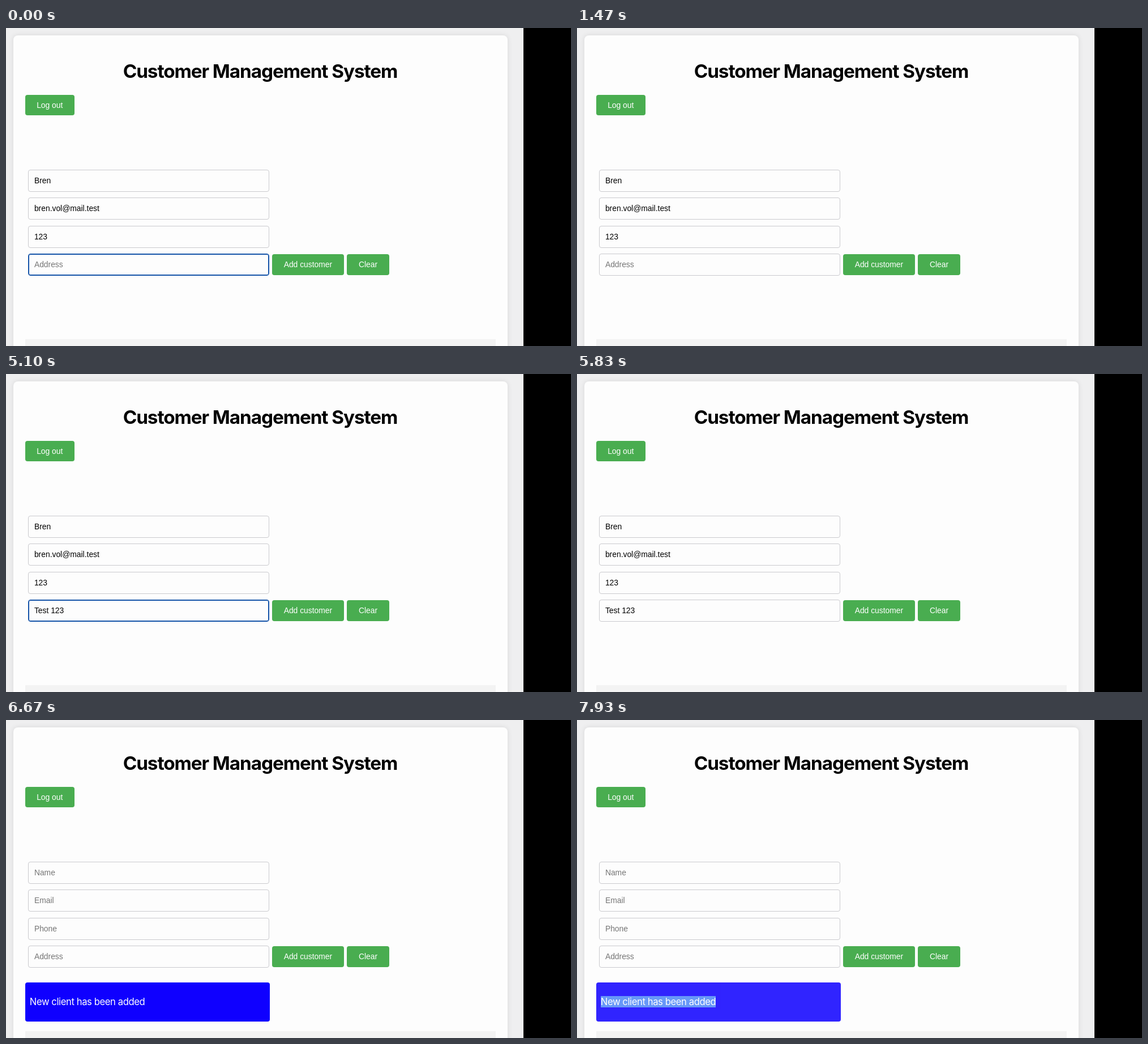
Animation of 998 by 561 pixels, one loop 8000 ms. Source, as an HTML page:

```html
<!DOCTYPE html>
<html lang="en">
<head>
<meta charset="utf-8">
<title>Customer form</title>
<style>
  html, body { margin: 0; width: 100%; height: 100%; overflow: hidden; }
  body { background: #000; }
  #stage {
    position: relative; width: 998px; height: 561px; overflow: hidden;
    font: 13.86px "Liberation Sans", Arial, sans-serif; color: #000;
  }
  #stage div { position: absolute; box-sizing: border-box; white-space: pre; }
  #stage .page { left: 0; top: 0; width: 913.5px; height: 561px; background: #efeff0; overflow: hidden; }
  .card {
    left: 12.5px; top: 12.5px; width: 873.5px; height: 640px;
    background: #fdfdfd; border-radius: 8px; box-shadow: 0 0 10px rgba(0, 0, 0, .1);
  }
  h1 {
    position: absolute; left: 12.5px; top: 56.2px; width: 873px; margin: 0;
    font: 700 33.27px/40px Inter, sans-serif; font-optical-sizing: none;
    letter-spacing: -.032em; text-align: center; white-space: nowrap;
  }
  .btn {
    height: 36.8px; line-height: 36.8px; border-radius: 4px;
    background: #49ad50; color: #fff; text-align: center;
  }
  .field {
    left: 38.5px; width: 426px; height: 38.8px; line-height: 36.8px;
    padding-left: 10.4px; border: 1px solid #cacace; border-radius: 4px;
  }
  .field.empty { color: #757575; }
  .field.focus { border-color: #1453a8; box-shadow: inset 0 0 0 1px #1453a8; }
  .caret {
    display: inline-block; width: 1px; height: 16px; margin-right: -1px;
    background: #000; vertical-align: -3px;
  }
  .toast {
    left: 33.5px; top: 463px; width: 432px; height: 69.2px; padding-left: 8.3px;
    background: #0f00ff; border-radius: 4px; color: #fff;
    font: 16.63px/69.2px Inter, sans-serif; letter-spacing: -.024em;
  }
  .toast.selected span { background: #4f88f8; }
  .head { left: 34px; top: 549px; width: 831px; height: 20px; background: #f3f3f3; }
</style>
</head>
<body>
<div id="stage">
  <div class="page">
    <div class="card"></div>
    <h1>Customer Management System</h1>
    <div class="btn" style="left:33.5px;top:117.5px;width:87.5px">Log out</div>
    <div class="field" style="top:250px"></div>
    <div class="field" style="top:299.4px"></div>
    <div class="field" style="top:348.8px"></div>
    <div class="field" style="top:398.2px"></div>
    <div class="btn" style="left:470px;top:399px;width:126.8px">Add customer</div>
    <div class="btn" style="left:602px;top:399px;width:75px">Clear</div>
    <div class="toast"><span>New client has been added</span></div>
    <div class="head"></div>
  </div>
</div>
<script>
  const LOOP = 8000, CLEARED = 6030, BLINK = 500;
  const fields = [...document.querySelectorAll('.field')];
  const toast = document.querySelector('.toast');
  const labels = ['Name', 'Email', 'Phone', 'Address'];
  const values = ['Bren', 'bren.vol@mail.test', '123'];
  const address = 'Test 123';
  const keys = [1700, 2900, 3070, 3230, 3430, 3830, 4070, 4400];

  // [time, opacity] steps of the message
  const fade = [
    [0, 0], [6070, .04], [6170, .14], [6270, .35], [6370, .65], [6400, .8], [6430, .92],
    [6670, 1], [7800, .97], [7830, .94], [7870, .91], [7930, .86]
  ];
  const stepAt = (list, t) => list.filter(s => s[0] <= t).pop()[1];

  function setField(el, label, value, focus, caret) {
    const html = (value || (caret ? '' : label)) + (caret ? '<i class="caret"></i>' : '') +
      (!value && caret ? label : '');
    if (el.innerHTML !== html) el.innerHTML = html;
    el.classList.toggle('empty', !value);
    el.classList.toggle('focus', focus);
  }

  function render(t) {
    const live = t < CLEARED;
    const typed = keys.filter(k => k <= t);
    const focus = t < 870 || (t >= 1630 && t < 5630);
    const sinceKey = t - typed[typed.length - 1];
    const caret = focus && typed.length > 0 && Math.floor(sinceKey / BLINK) % 2 === 0;
    values.forEach((v, i) => setField(fields[i], labels[i], live ? v : '', false, false));
    setField(fields[3], labels[3], live ? address.slice(0, typed.length) : '', focus, caret);
    toast.style.opacity = stepAt(fade, t);
    toast.classList.toggle('selected', t >= 7770);
  }

  function tick() {
    render(performance.now() % LOOP);
    requestAnimationFrame(tick);
  }
  tick();
</script>
</body>
</html>
```
